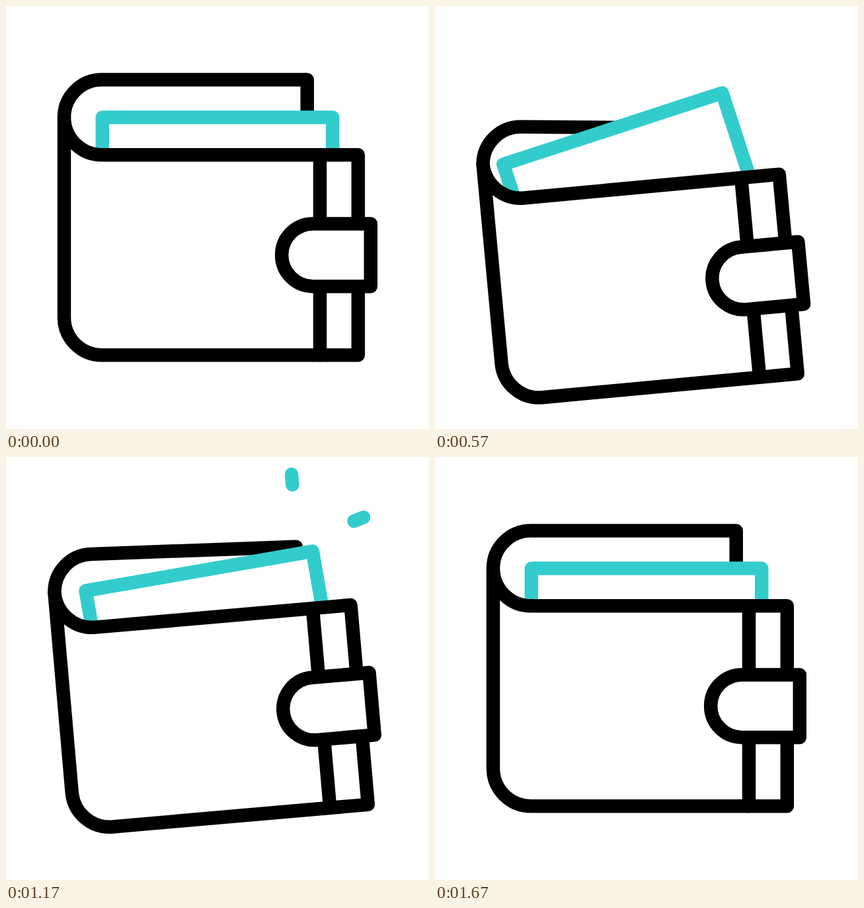
An HTML page for the animation above (2000 ms loop, 640 by 640 pixels).

```html
<!DOCTYPE html>
<html lang="en">
<head>
<meta charset="utf-8">
<title>Wallet</title>
<style>
  html, body { margin: 0; width: 100%; height: 100%; overflow: hidden; background: #fff; }
  svg { display: block; width: 100vw; height: 100vh; }
  path { fill: #fff; stroke: #000; stroke-width: 20.5; stroke-linecap: round; stroke-linejoin: round; }
  .teal { stroke: #33cccc; }
</style>
</head>
<body>
<svg viewBox="0 0 640 640">
  <g id="wallet">
    <path class="teal" id="rayUp"/>
    <path class="teal" id="raySide"/>
    <path id="flap" d="M88 168.5A57 57 0 0 1 145 111.5H455.7V180"/>
    <path id="card" class="teal" d="M145.8 330V168.5H494.2V330"/>
    <path d="M88 168.5A57 57 0 0 0 145 225.2H532.8V528.2H145A57 57 0 0 1 88 471.2Z"/>
    <path d="M475 225.2V329.5M475 424.2V528.2"/>
    <path d="M551.8 329.5H464.5A47.3 47.3 0 0 0 464.5 424.2H551.8Z"/>
  </g>
</svg>
<script>
const LOOP = 2000, STEP = 100 / 3, LAST = 50, RAY = 68;

const $ = id => document.getElementById(id);
const ramp = (x, a, b) => Math.min(1, Math.max(0, (x - a) / (b - a)));
const ease = u => (1 - Math.cos(Math.PI * u)) / 2;

// A swing eases from rest through its turning points [step, value] and back to rest.
const swing = (start, turns, end) => x => {
  let [from, value] = [start, 0];
  for (const [to, next] of [...turns, [end, 0]]) {
    if (x <= to) return value + (next - value) * ease(ramp(x, from, to));
    [from, value] = [to, next];
  }
  return 0;
};

const tilt = swing(0, [[13.25, -11], [24, 10], [35.3, -5]], 46);
const drop = swing(1.7, [[14.6, 51.2], [29.7, 8.3], [40.4, 25.5]], 50);
const bend = swing(0, [[14, 7], [25, 0], [38, 3.3]], 50);
const lean = swing(1.5, [[16.2, -13.1], [25.8, 7.4], [39, -8.2]], 50);

function ray(id, x, y, deg, from, to) {
  const a = deg * Math.PI / 180, c = Math.cos(a), s = Math.sin(a);
  $(id).style.display = to > from ? "" : "none";
  $(id).setAttribute("d", `M${x + c * from} ${y + s * from}L${x + c * to} ${y + s * to}`);
}

function draw(step) {
  const move = (id, value) => $(id).setAttribute("transform", value);
  move("wallet", `translate(0 ${drop(step)}) rotate(${tilt(step)} 320 346)`);
  move("flap", `rotate(${bend(step)} 88 168.5)`);
  move("card", `rotate(${lean(step)} 145.8 292)`);
  // Each ray grows outwards, then its tail catches up.
  const from = RAY * ramp(step, 30, 36.5), to = RAY * ramp(step, 27.4, 34);
  ray("rayUp", 460.7, 88.5, -90, from, to);
  ray("raySide", 498.6, 114, -16.5, from, to);
}

function tick() {
  const t = performance.now() % LOOP;
  // Steps begin on whole hundredths of a second.
  const step = Math.floor((Math.floor(t / 10) * 10 + 5) / STEP);
  draw(Math.min(step, LAST));
  requestAnimationFrame(tick);
}
tick();
</script>
</body>
</html>
```
